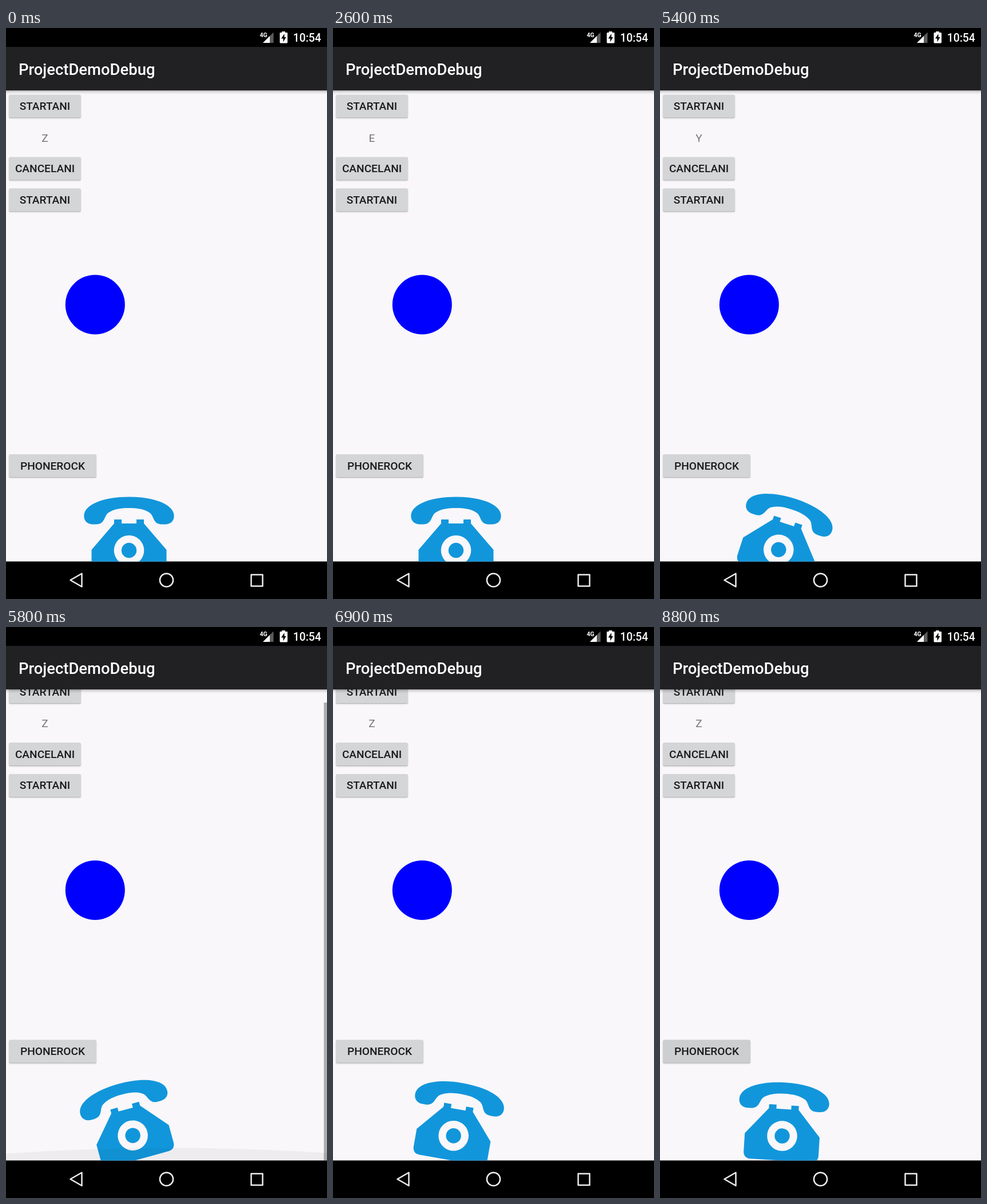
Write an HTML page that moves like this. It is 561 px wide and 998 px high and loops after 8.9 s.

```html
<!DOCTYPE html>
<html lang="en">
<head>
<meta charset="utf-8">
<title>ProjectDemoDebug</title>
<style>
  html, body { margin: 0; width: 100%; height: 100%; overflow: hidden; background: #000; }
  svg { display: block; width: 561px; height: 998px; font-family: Roboto, sans-serif; }
  .button rect { fill: #d4d5d6; }
  .button .shade { fill: #000; opacity: .15; }
  .button .press { fill: #000; opacity: 0; }
  .button text { font-size: 19.1px; font-weight: 500; fill: #1b1b1c; text-anchor: middle; }
  #letter { font-size: 19.1px; fill: #747376; text-anchor: middle; }
  .nav { fill: none; stroke: #ececec; stroke-width: 2.5; stroke-linejoin: round; }
</style>
</head>
<body>
<svg viewBox="0 0 561 998">
  <defs>
    <clipPath id="view"><rect y="109" width="561" height="823.4"/></clipPath>
    <linearGradient id="drop" x2="0" y2="1">
      <stop offset="0" stop-color="#000" stop-opacity=".32"/>
      <stop offset=".4" stop-color="#000" stop-opacity=".1"/>
      <stop offset="1" stop-color="#000" stop-opacity="0"/>
    </linearGradient>
    <filter id="soft" x="-10%" y="-20%" width="120%" height="150%">
      <feGaussianBlur stdDeviation="1.1"/>
    </filter>
  </defs>

  <rect width="561" height="998"/>
  <rect y="109" width="561" height="823.4" fill="#f9f7fa"/>

  <g clip-path="url(#view)">
    <g id="content">
      <g id="buttons"></g>
      <text id="letter" x="68" y="198.5">Z</text>
      <circle id="ball" cx="155.8" cy="483.4" r="52" fill="#00f"/>
      <g id="phone" fill="#1296db">
        <path d="M136.3 853C136.3 832 172 819.5 215 819.5S293.7 832 293.7 853C293.7 862 287 867.5 278 867.5H273C255 867.5 260 851 249 846C240 840.5 228 839 215 839S190 840.5 181 846C170 851 175 867.5 157 867.5H152C143 867.5 136.3 862 136.3 853Z"/>
        <path d="M189 859H202V866H228V859H241V866L280.5 912V943Q280.5 956 267.5 956H162.5Q149.5 956 149.5 943V912L189 866Z"/>
        <circle cx="215" cy="913" r="26.3" fill="#f9f7fa"/>
        <circle cx="215" cy="913" r="13.2"/>
      </g>
    </g>
    <path id="glow" d="M0 933V908Q279 869 561 906V933Z" opacity="0"/>
    <rect id="bar" x="555.5" y="132" width="5.5" height="801" opacity="0"/>
    <rect y="109" width="561" height="7" fill="url(#drop)"/>
  </g>

  <rect y="33" width="561" height="76" fill="#212023"/>
  <text x="22" y="81.5" font-size="27.45" font-weight="500" fill="#fff">ProjectDemoDebug</text>

  <g fill="#fff">
    <text x="443.5" y="16" font-size="10.5" font-weight="700">4G</text>
    <path d="M467.5 7.5V26H449Z" fill="#5c5c5c"/>
    <path d="M461 14V26H449Z"/>
    <path d="M482 8V6H488V8H491Q492 8 492 9V25Q492 26.5 490.5 26.5H480Q478.500 26.5 478.500 25V9Q478.500 8 479.500 8Z"/>
    <path d="M486.5 10L481 18.5H484.5V24.5L489.5 16H486.5Z" fill="#000"/>
    <text x="501.8" y="23.8" font-size="19.3" font-weight="500">10:54</text>
  </g>

  <g class="nav">
    <path d="M112.5 965L132.5 953.5V976.5Z"/>
    <circle cx="280.5" cy="965" r="11.6"/>
    <rect x="428.5" y="955.5" width="20" height="20"/>
  </g>
</svg>
<script>
const LOOP = 8900;
const SCROLL_AT = 5700;
const SWING = 468; // one full rock of the phone

const $ = id => document.getElementById(id);
const clamp = x => Math.min(1, Math.max(0, x));
const presses = [];

function addButton(label, y, width, ...times) {
  const box = `x="5" width="${width}" height="40" rx="2.7"`;
  $('buttons').insertAdjacentHTML('beforeend', `<g class="button">
    <rect class="shade" ${box} y="${y + 1.8}" filter="url(#soft)"/>
    <rect class="shade" ${box} y="${y + 1}"/>
    <rect ${box} y="${y}"/>
    <rect class="press" ${box} y="${y}"/>
    <text x="${5 + width / 2}" y="${y + 26.6}">${label}</text></g>`);
  presses.push({ el: $('buttons').lastElementChild.querySelector('.press'), times });
}

addButton('STARTANI', 116.5, 126, 1500);
addButton('CANCELANI', 225.5, 126);
addButton('STARTANI', 280.3, 126, 3400);
addButton('PHONEROCK', 745, 153, 4700, 8600);

// The screen refreshes about three times a second, a little faster after the scroll.
function hold(t) {
  return t + 40 < 5760 ? Math.floor((t + 40) / 320) * 320 : Math.floor(t / 300) * 300;
}

function bounce(x) {
  const t = x * 1.1226;
  if (t < .3535) return 8 * t * t;
  if (t < .7408) return 8 * (t - .54719) ** 2 + .7;
  if (t < .9644) return 8 * (t - .8526) ** 2 + .9;
  return 8 * (t - 1.0435) ** 2 + .95;
}

function radius(t) {
  const x = (t - (t < SCROLL_AT ? 3330 : 6957)) / 1000;
  return x < 0 || x > 1 ? 52 : 5.2 + 46.8 * bounce(x);
}

function letter(t) {
  if (t < 1400) return 'Z';
  const x = clamp((t - 1450) / 4000);
  return String.fromCharCode(65 + Math.floor(25 * (.5 - Math.cos(Math.PI * x) / 2)));
}

function tilt(t) {
  const turns = (t - (t < 8600 ? 4836 : 8686)) / SWING;
  return turns < 0 || turns > 6 ? 0 : 18.6 * Math.sin(2 * Math.PI * turns);
}

function draw(t) {
  const scrolled = t >= SCROLL_AT;
  const fade = scrolled ? clamp((6900 - t) / 300) : 0;
  const glow = fade * clamp((t - 5400) / 600);

  $('letter').textContent = letter(t);
  $('ball').setAttribute('r', radius(t));
  $('phone').setAttribute('transform', `rotate(${tilt(t)} 215 888)`);
  $('content').setAttribute('transform', `translate(0 ${scrolled ? -23.4 : 0})`);
  $('glow').setAttribute('opacity', .085 * glow);
  $('glow').setAttribute('transform', `translate(0 933) scale(1 ${glow}) translate(0 -933)`);
  $('bar').setAttribute('opacity', .3 * fade);

  for (const { el, times } of presses) {
    el.style.opacity = times.some(at => t >= at && t < at + 400) ? .03 : 0;
  }
}

const begin = performance.now();
function frame() {
  draw(hold((performance.now() - begin) % LOOP));
  requestAnimationFrame(frame);
}
frame();
</script>
</body>
</html>
```
